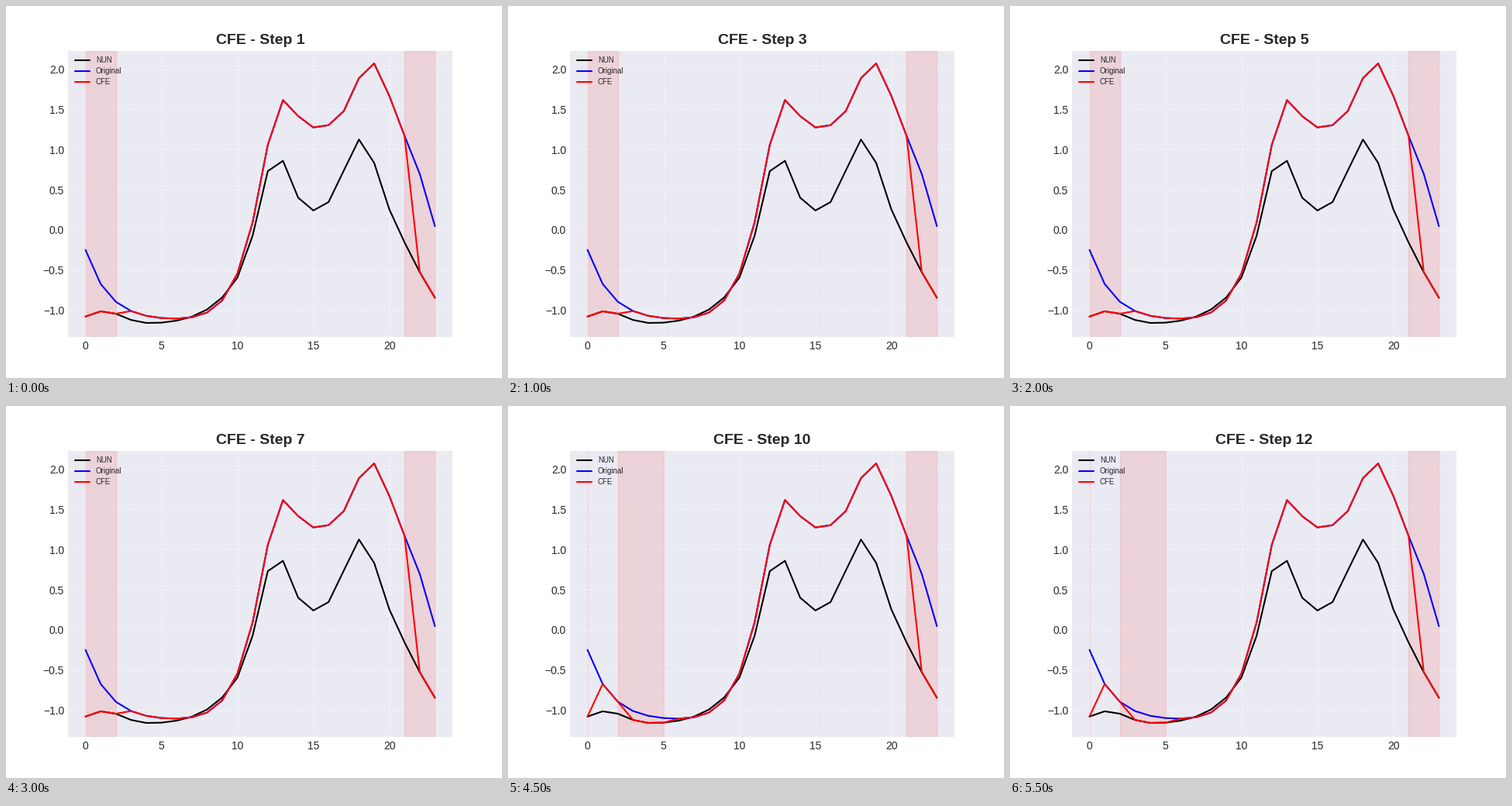
A matplotlib script that plays this animation: 640x480 px, repeating every 6000 ms.

```python
import matplotlib.pyplot as plt
import numpy as np
from matplotlib.animation import FuncAnimation

STEPS = 12
STEP_MS = 500
SWITCH_STEP = 10

plt.style.use("seaborn-v0_8-darkgrid")
plt.rcParams["font.family"] = "Liberation Sans"

hours = np.arange(24)


def sigmoid(center, rate):
    return 1 / (1 + np.exp(-rate * (hours - center)))


def bump(height, center, width):
    return height * np.exp(-((hours - center) / width) ** 2)


# Each day is a plateau with a midday and an evening peak over a night level.
query = (-1.14 + 2.44 * (sigmoid(11.18, 0.98) - sigmoid(22.95, 1.15))
         + bump(0.70, 12.72, 1.29) + bump(0.81, 18.83, 1.52)
         + 0.89 * np.exp(-0.65 * hours))
neighbour = (-1.185 + 1.46 * (sigmoid(10.7, 0.7) - sigmoid(21.8, 1.0))
             + bump(0.98, 12.45, 1.34) + bump(0.90, 18.15, 1.48)
             + bump(0.17, 1.2, 1.69))

fig, ax = plt.subplots(figsize=(6.4, 4.8), dpi=100)


def copied_ranges(step):
    """Inclusive index ranges taken over from the neighbour."""
    start = [(0, 2)] if step < SWITCH_STEP else [(0, 0), (3, 5)]
    return start + [(22, 23)]


def draw(frame):
    step = frame + 1
    ranges = copied_ranges(step)
    counterfactual = query.copy()
    for first, last in ranges:
        counterfactual[first:last + 1] = neighbour[first:last + 1]

    ax.clear()
    ax.plot(neighbour, color="black", label="NUN")
    ax.plot(query, color="blue", label="Original")
    ax.plot(counterfactual, color="red", label="CFE")
    for first, last in ranges:
        ax.axvspan(max(first - 1, 0), last, color="red", alpha=0.1, linewidth=1)
    ax.set_ylim(-1.337, 2.2328)
    ax.set_title(f"CFE - Step {step}", fontsize=14, fontweight="bold")
    ax.legend(loc="upper left", bbox_to_anchor=(0, 1.0027), fontsize=7,
              labelspacing=0.4)
    ax.grid(True, linestyle="--", alpha=0.6)


anim = FuncAnimation(fig, draw, frames=STEPS, interval=STEP_MS,
                     init_func=lambda: None, repeat=True, repeat_delay=0)
plt.show()
```
